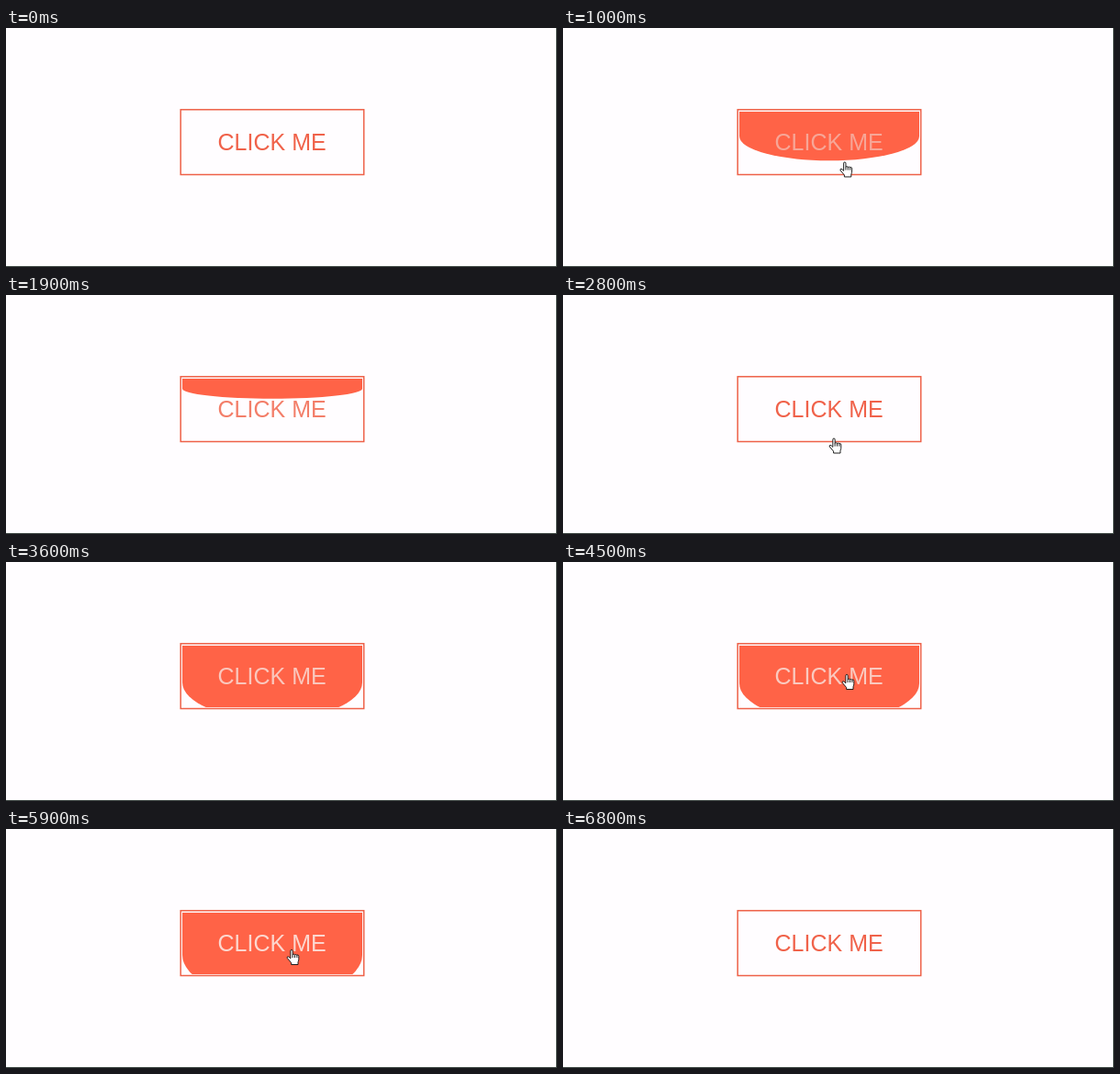
Animation, 600 px wide and 260 px high, one loop 7200 ms. Source, as an HTML page:

```html
<!DOCTYPE html>
<html lang="en">
<head>
<meta charset="utf-8">
<title>Button hover</title>
<style>
  html, body { margin: 0; width: 100%; height: 100%; overflow: hidden; background: #fffdff; }
  svg { display: block; width: 600px; height: 260px; }
  text { font: 25px "Liberation Sans", Arial, sans-serif; text-anchor: middle; }
  .cursor { fill: #fff; stroke: #111; stroke-width: 1.2; stroke-linejoin: round; }
  .cursor .knuckles { fill: none; }
</style>
</head>
<body>
<svg viewBox="0 0 600 260">
  <defs>
    <clipPath id="inner"><rect x="192" y="91" width="196" height="67"/></clipPath>
  </defs>
  <rect x="190.2" y="88.8" width="199.5" height="70.7" fill="none" stroke="#ee6148" stroke-width="1.5"/>
  <path id="fill" fill="#ff6347" clip-path="url(#inner)"/>
  <text id="label" x="289.6" y="133">CLICK ME</text>
  <path d="M0 259.5H600M599.5 0V260" stroke="#3c4541"/>
  <g id="hand" class="cursor">
    <g transform="scale(.78) translate(-7 -1)">
      <path d="M5.5 13V2.5a1.5 1.5 0 0 1 3 0V8q0-1 1.5-1t1.5 1.5q0-1 1.5-1t1.5 1.5q0-1 1-1q1.5 0 1.5 2V14q0 2-1 4V21.5H6.5V19L1 12.5q-.8-2 1-2.2q1 0 3.5 2.7z"/>
      <path class="knuckles" d="M8.5 8v4M11.5 8.5v3.5M14.5 9v3"/>
    </g>
  </g>
  <path id="arrow" class="cursor" d="M0 0V14L3.2 11L5.5 16.2L7.8 15.2L5.5 10.2H10Z"/>
</svg>
<script>
const LOOP = 7200, STEP = 100, FADE = 600;
const AWAY_X = 30, AWAY_Y = 210, BUTTON_BOTTOM = 161;
const $ = id => document.getElementById(id);
const fill = $('fill'), label = $('label'), hand = $('hand'), arrow = $('arrow');

// When the pointer is over the button, and where it rests
const visits = [
  { over: 840, out: 1590, x: 307, y: 145.5 },
  { over: 2820, out: 3470, x: 305, y: 129 },
  { over: 4260, out: 4940, x: 309, y: 122.5 },
  { over: 5620, out: 6180, x: 311, y: 131.5 }
];

const bezier = (a, b, s) => 3 * a * s * (1 - s) ** 2 + 3 * b * s * s * (1 - s) + s ** 3;

// The CSS "ease" curve: cubic-bezier(.25, .1, .25, 1)
function ease(x) {
  if (x <= 0) return 0;
  if (x >= 1) return 1;
  let lo = 0, hi = 1;
  for (let i = 0; i < 24; i++) {
    const mid = (lo + hi) / 2;
    if (bezier(.25, .25, mid) < x) lo = mid; else hi = mid;
  }
  return bezier(.1, 1, lo);
}

// Glides up from below to the rest point, then drops away again
function pointerAt(t) {
  for (const { over, out, x, y } of visits) {
    const arrive = ease((t - over + 160) / 360);
    const leave = Math.max(0, (t - out + 100) / 220) ** 2;
    if (arrive > 0 && leave < 1) {
      const away = Math.max(1 - arrive, leave);
      return [x - AWAY_X * away, y + (AWAY_Y - y) * away];
    }
  }
  return null;
}

function place(el, pos) {
  el.style.display = pos ? '' : 'none';
  if (pos) el.setAttribute('transform', `translate(${pos})`);
}

function draw(t) {
  const level = visits.reduce((sum, v) =>
    sum + ease((t - v.over) / FADE) - ease((t - v.out) / FADE), 0);

  const ry = Math.max(0, level) * 60, side = 91 + ry;
  fill.setAttribute('d', ry > .1 ? `M192 91H388V${side}A98 ${ry} 0 0 1 192 ${side}Z` : '');

  const mix = (a, b) => Math.round(a + (b - a) * level);
  label.setAttribute('fill', `rgb(${mix(240, 255)},${mix(98, 250)},${mix(74, 247)})`);

  const pos = pointerAt(t);
  const inside = pos && pos[1] < BUTTON_BOTTOM;
  place(hand, inside ? pos : null);
  place(arrow, inside ? null : pos);
}

function tick() {
  const t = performance.now() % LOOP;
  draw(Math.floor(t / STEP) * STEP);
  requestAnimationFrame(tick);
}
tick();
</script>
</body>
</html>
```
